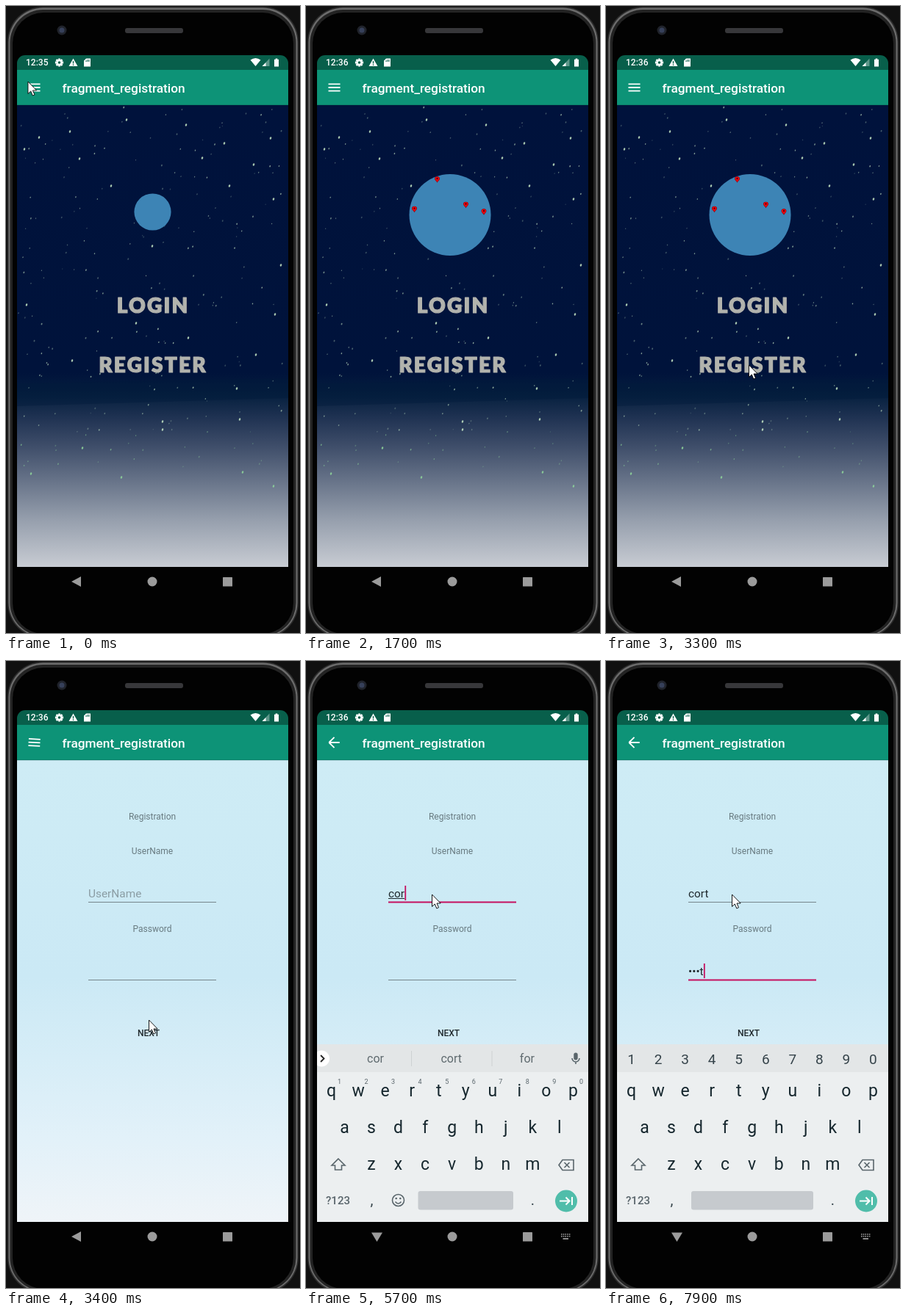
Write an HTML page with a canvas that moves like this. It is 400 px wide and 854 px high and loops after 8 s.

```html
<!DOCTYPE html>
<html lang="en">
<head>
<meta charset="utf-8">
<title>Registration demo</title>
<style>
html, body { margin: 0; width: 100%; height: 100%; overflow: hidden; background: #000; }
canvas { display: block; width: 400px; height: 854px; }
</style>
</head>
<body>
<canvas id="stage" width="400" height="854"></canvas>
<script>
const c = document.getElementById('stage').getContext('2d');
const LOOP = 8000, FORM = 3395, FOCUS = 4500, PASSWORD = 6700;
const USER = 'cort', USER_KEYS = [5300, 5500, 5700, 5900], PASS_KEYS = [7100, 7300, 7500, 7700];
const PINK = '#c5105f';

const clamp = x => Math.max(0, Math.min(1, x));
const progress = (t, from, to) => clamp((t - from) / (to - from));
const ease = x => x * x * (3 - 2 * x);
const mix = (a, b, p) => a + (b - a) * p;

function rect(x, y, w, h, fill, r = 0) {
  c.fillStyle = fill;
  c.beginPath();
  c.roundRect(x, y, w, h, r);
  c.fill();
}
function circle(x, y, r, fill) {
  c.fillStyle = fill;
  c.beginPath();
  c.arc(x, y, r, 0, 7);
  c.fill();
}
// Draws an SVG path moved to x, y; a line width makes it a stroke.
function path(d, x, y, color, width) {
  c.save();
  c.translate(x, y);
  const p = new Path2D(d);
  if (width) {
    c.strokeStyle = color;
    c.lineWidth = width;
    c.stroke(p);
  } else {
    c.fillStyle = color;
    c.fill(p, 'evenodd');
  }
  c.restore();
}
function text(s, x, y, size, color, align = 'center', weight = 400) {
  c.font = `${weight} ${size}px Roboto, sans-serif`;
  c.textAlign = align;
  c.fillStyle = color;
  c.fillText(s, x, y);
}
function gradient(y0, y1, stops) {
  const g = c.createLinearGradient(0, y0, 0, y1);
  stops.forEach(([y, color]) => g.addColorStop((y - y0) / (y1 - y0), color));
  return g;
}

// Star field: a few bright stars, the rest seeded.
let seed = 41;
const random = () => (seed = seed * 16807 % 2147483647) / 2147483647;
const bright = [164,155, 245,162, 87,171, 100,208, 25,195, 267,207, 143,245, 304,245, 374,353, 28,407,
  199,327, 366,420, 177,432, 314,521, 213,566, 213,577, 104,602, 34,637, 322,635, 364,654,
  364,263, 45,179, 360,180, 337,216, 297,187, 318,563, 157,642, 90,483, 340,475, 248,452];
const stars = [];
for (let i = 0; i < bright.length; i += 2) stars.push([bright[i], bright[i + 1], 1.4, 0.85]);
for (let i = 0; i < 220; i++) {
  const y = 138 + random() * 490;
  stars.push([16 + random() * 367, y, 0.6 + random() * 0.5, 0.2 + random() * 0.5]);
}

function phone() {
  rect(0, 0, 400, 854, '#101010');
  rect(2, 1, 396, 860, '#2c2c2c', 48);
  rect(3.5, 2.5, 393, 857, '#6c6c6c', 47);
  rect(5.5, 5, 389, 853, '#232323', 45);
  rect(9, 9, 382, 846, '#020202', 42);
  rect(162, 30, 79, 7, '#37373a', 3);
  circle(76, 33, 6.5, '#20232b');
  circle(76, 33, 3.5, '#36405a');
}

function night() {
  rect(15, 135, 369, 629, gradient(135, 764, [[135, '#00123c'], [500, '#00133b'], [530, '#06203f'],
    [560, '#1f3252'], [600, '#3f4e6a'], [650, '#6a768b'], [700, '#969fad'], [764, '#c8ccd3']]));
  path('M15 514 L384 507 V534 L15 545Z', 0, 0, 'rgba(0,25,58,.4)');
  for (const [x, y, r, a] of stars) {
    c.globalAlpha = a;
    c.beginPath();
    c.ellipse(x, y, r * 0.85, r * 1.3, 0.35, 0, 7);
    c.fillStyle = y > 580 ? '#8fd49a' : '#c4e4c4';
    c.fill();
  }
  c.globalAlpha = 1;
}

function menuText(s, y) {
  c.font = '900 28px Lato, sans-serif';
  c.letterSpacing = '2.2px';
  c.textAlign = 'center';
  c.lineJoin = 'round';
  c.lineWidth = 1.1;
  c.fillStyle = c.strokeStyle = '#b2b3ad';
  c.fillText(s, 200, y);
  c.strokeText(s, 200, y);
  c.letterSpacing = '0px';
}

function pin(x, y, scale) {
  c.save();
  c.translate(x, y);
  c.scale(scale, scale);
  path('M0 12 C-2 5 -9.5 2 -9.5 -3 A9.5 9 0 0 1 9.5 -3 C9.5 2 2 5 0 12Z', 0, 0, '#700008');
  path('M0 10 C-2 4 -8.5 2 -8.5 -3 A8.5 8 0 0 1 8.5 -3 C8.5 2 2 4 0 10Z', 0, 0, '#e8000c');
  circle(0, -4, 2.8, '#3b0004');
  c.restore();
}

function welcome(t) {
  night();
  const p = progress(t, 0, 450);
  circle(mix(199.5, 196, p), mix(280.5, 284.5, p), mix(25, 55.5, p), '#3d84b5');
  [[147.5, 277], [178.5, 236.5], [217.5, 271], [242, 280.5]].forEach(([x, y], i) => {
    const start = 700 + i * 200;
    if (t >= start) pin(x, y, mix(1.35, 0.36, progress(t, start, start + 300)));
  });
  menuText('LOGIN', 418);
  menuText('REGISTER', 499);
}

function field(y, value, focused, caretOn, composing) {
  text(value, 112, y - 6, 15.4, '#1f292d', 'left');
  const width = c.measureText(value).width;
  if (composing) rect(112, y - 5, width, 1, '#1f292d');
  if (focused) {
    rect(112, y - 0.5, 174, 2, PINK);
    if (caretOn) rect(112 + width + 0.3, y - 22, 1.8, 20, PINK);
  } else rect(112, y, 174, 1, '#76858b');
}

function form(t) {
  rect(15, 135, 369, 629, gradient(135, 764, [[135, '#ceecf5'], [430, '#cbe9f5'],
    [540, '#d6edf7'], [650, '#e2f1f9'], [764, '#eff4f8']]));
  text('Registration', 199, 216, 12, '#687a80');
  text('UserName', 199, 263, 12, '#687a80');
  text('Password', 199, 369, 12, '#687a80');

  const typed = keys => keys.filter(k => t >= k).length;
  const n = typed(USER_KEYS), m = typed(PASS_KEYS);
  const lastEvent = Math.max(...[0, FOCUS, PASSWORD, ...USER_KEYS, ...PASS_KEYS].filter(k => k <= t));
  const caretOn = (t - lastEvent) % 1000 < 500;
  const inPassword = t >= PASSWORD;
  if (!n) text('UserName', 112, 322, 15.4, '#8b9da4', 'left');
  field(328, USER.slice(0, n), t >= FOCUS && !inPassword, caretOn, n && !inPassword);
  field(434, m ? '•'.repeat(m - 1) + USER[m - 1] : '', inPassword, caretOn, false);
  text('NEXT', 194, 511, 12, '#20292d', 'center', 500);

  const up = ease(progress(t, 4580, 4850));
  if (up > 0) {
    c.save();
    c.translate(0, (1 - up) * 242);
    keyboard(USER.slice(0, n), inPassword);
    c.restore();
  }
}

function keyRow(keys, x, y, size = 23, color = '#16272e') {
  [...keys].forEach((k, i) => text(k, x + i * 36.55, y, size, color));
}

function keyboard(word, numeric) {
  const grey = '#59656b';
  rect(15, 522, 369, 242, '#eceff0');
  rect(15, 522, 369, 38, '#e3e6e7');
  if (numeric) keyRow('1234567890', 34.5, 549, 19, '#35434a');
  else {
    circle(21, 541.5, 11, '#fff');
    path('M-2.5 -4.5 L2 0 L-2.5 4.5', 22.5, 541.5, '#222', 1.8);
    if (word) [word, USER, 'for'].forEach((s, i) => text(s, 94.5 + i * 103.2, 547, 16, '#5f6a6f'));
    rect(143, 531, 1, 21, '#cdd1d3');
    rect(252.5, 531, 1, 21, '#cdd1d3');
    rect(364.3, 533.5, 5.4, 10, grey, 2.7);
    path('M-5 0 A5 5 0 0 0 5 0 M0 5 V8', 367, 541, grey, 1.6);
    keyRow('1234567890', 45.5, 576, 9, grey);
  }
  keyRow('qwertyuiop', 34.5, 593);
  keyRow('asdfghjkl', 52.5, 643);
  keyRow('zxcvbnm', 89, 693);
  path('M0 -8 L9 1 H4.5 V7 H-4.5 V1 H-9Z', 44, 686, grey, 1.6);
  path('M-10 0 L-5 -7 H10 V7 H-5Z M-2.5 -3.5 L4.5 3.5 M4.5 -3.5 L-2.5 3.5', 354, 686.5, grey, 1.6);
  text('?123', 43.5, 740, 15, grey, 'center', 500);
  text(',', 89.5, 741, 20, '#35434a');
  text('.', 308.5, 741, 20, '#35434a');
  if (!numeric) {
    path('M8 0 A8 8 0 1 1 -8 0 A8 8 0 1 1 8 0 M-4 2 Q0 7 4 2', 125.5, 734.5, grey, 1.6);
    circle(122.7, 732, 1.3, grey);
    circle(128.3, 732, 1.3, grey);
  }
  const left = numeric ? 116 : 152.5;
  rect(left, 722, 282 - left, 25.5, '#c6cace', 3);
  circle(354, 735.5, 15, '#50bdaa');
  path('M-9 0 H4 M-0.5 -5 L4.5 0 L-0.5 5 M8 -5.5 V5.5', 354, 735.5, '#fff', 2);
}

// Three bars that spin into a back arrow.
function menuIcon(p) {
  c.save();
  c.translate(38.5, 111);
  c.rotate(Math.PI * p);
  c.strokeStyle = '#fff';
  c.lineWidth = 1.8;
  c.beginPath();
  for (const s of [-1, 1]) {
    c.moveTo(mix(-8, 0, p), s * mix(4.6, 7.2, p));
    c.lineTo(mix(8, 7.2, p), s * mix(4.6, 0, p));
  }
  c.moveTo(mix(-8, -7.2, p), 0);
  c.lineTo(mix(8, 7, p), 0);
  c.stroke();
  c.restore();
}

function bars(t) {
  rect(15, 67, 369, 20, '#085f4b');
  rect(15, 87, 369, 48, '#0d9377');
  rect(15, 134.5, 369, 1, 'rgba(0,50,50,.3)');
  text(t < 400 ? '12:35' : '12:36', 27, 81, 12, '#fff', 'left', 500);
  for (let i = 0; i < 4; i++) {
    c.save();
    c.translate(72.5, 77);
    c.rotate(i * Math.PI / 4);
    rect(-1.4, -5.6, 2.8, 11.2, '#fff');
    c.restore();
  }
  circle(72.5, 77, 4, '#fff');
  circle(72.5, 77, 1.8, '#085f4b');
  path('M0 -5.5 L6 5 H-6Z M-.7 -2 V1.5 H.7 V-2Z M-.7 2.6 V4 H.7 V2.6Z', 91.5, 77, '#fff');
  path('M-1.5 -5.5 H4.5 V5.5 H-4.5 V-2.5Z M-2 -3 V-1 H-1 V-3Z M0 -4 V-1 H1 V-4Z M2 -4 V-1 H3 V-4Z', 110.5, 77, '#fff');
  path('M0 5.5 L-7 -3 Q0 -8 7 -3Z', 339.5, 76.5, '#fff');
  path('M5 -5.5 V5 H-5Z', 353.5, 77, 'rgba(255,255,255,.35)');
  path('M0 0 V5 H-5Z', 353.5, 77, '#fff');
  path('M-1.3 -5.5 H1.3 V-4.3 H3 V5.5 H-3 V-4.3 H-1.3Z', 368, 77, '#fff');
  menuIcon(ease(progress(t, FORM - 18, FORM + 280)));
  text('fragment_registration', 76.5, 117.5, 17.25, '#fff', 'left', 500);
}

function navigation(keys) {
  const grey = '#9b9b9b';
  path(keys ? 'M-7.5 -5.5 H7.5 L0 7Z' : 'M-7.5 0 L5.5 -7 V7Z', 96.5, 784, grey);
  circle(199, 784, 6.5, grey);
  rect(295, 778, 13, 12.5, grey, 0.5);
  if (keys) {
    for (let i = 0; i < 10; i++) rect(347 + i % 5 * 2.7, 780 + (i > 4) * 2.8, 1.6, 1.6, grey);
    rect(349.5, 786, 7.5, 1.8, grey);
  }
}

function cursor(t) {
  let x, y;
  if (t < 300) {
    const p = progress(t, 0, 300);
    x = mix(30, 7, p);
    y = mix(103, 100, p);
  } else if (t < 2900) return;
  else {
    const a = ease(progress(t, 2900, 3200)), b = ease(progress(t, 3700, 4200));
    x = mix(mix(240, 194.5, a), 171.5, b);
    y = mix(mix(560, 489, a), 318, b);
  }
  const arrow = 'M0 0 V16.5 L3.8 13 L6.3 19 L9 17.8 L6.5 12 H11.7Z';
  path(arrow, x, y, '#fff');
  path(arrow, x, y, '#000', 0.9);
}

function draw(now) {
  const t = now % LOOP;
  phone();
  c.save();
  c.beginPath();
  c.roundRect(15, 67, 369, 697, [11, 11, 0, 0]);
  c.clip();
  (t < FORM ? welcome : form)(t);
  bars(t);
  c.restore();
  navigation(t >= 4600);
  cursor(t);
}

const start = performance.now();
(function frame() {
  draw(performance.now() - start);
  requestAnimationFrame(frame);
})();
</script>
</body>
</html>
```
